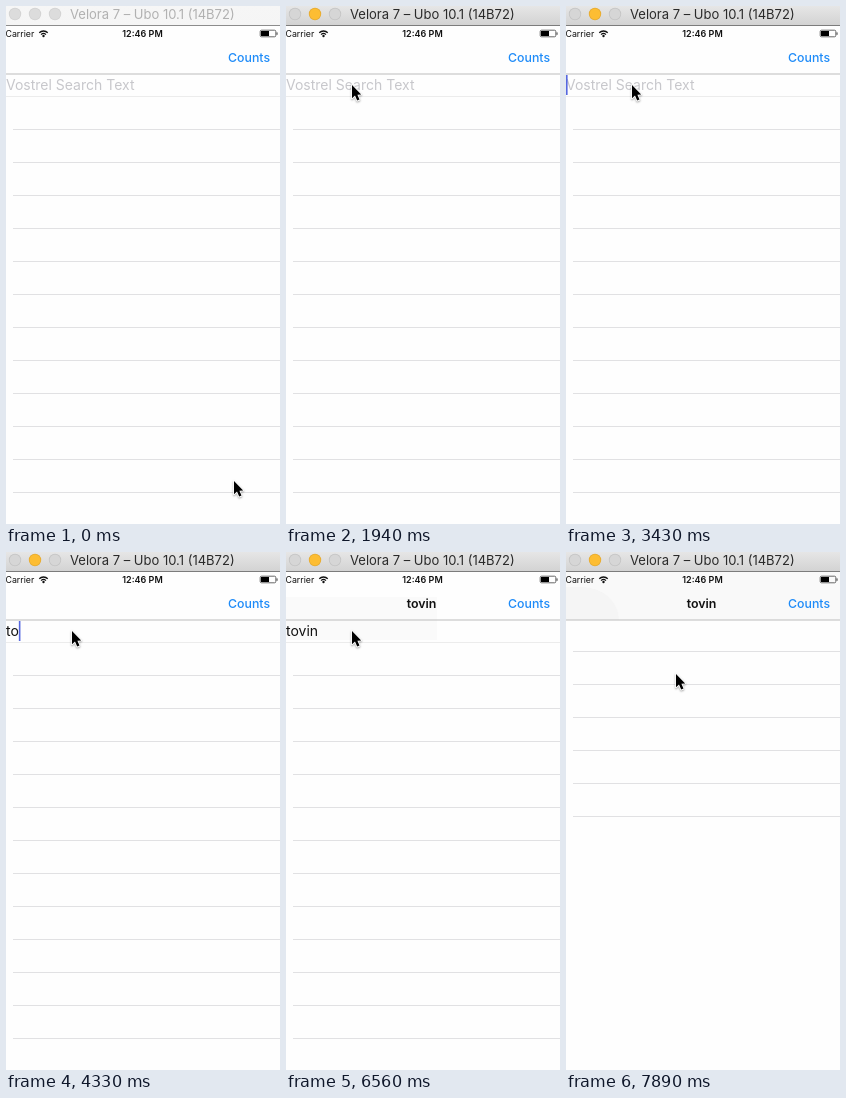
An HTML page with a canvas for the animation above (8000 ms loop, 274 by 518 pixels).

```html
<!DOCTYPE html>
<html lang="en">
<head>
<meta charset="utf-8">
<title>Search screen</title>
<style>
html, body { margin: 0; width: 100%; height: 100%; overflow: hidden; background: #fff; }
canvas { display: block; width: 274px; height: 518px; }
</style>
</head>
<body>
<canvas id="stage"></canvas>
<script>
const W = 274, H = 518, LOOP = 8000;
const BEAT = 148.8; // the screen refreshes once per beat
const FOCUS = 16, TYPE = 28, SUBMIT = 44, SCROLL = 52, LOADED = 53;
const ROW = 33;
const FONT = 'Inter, Roboto, "Liberation Sans", sans-serif';
const QUERY = 'tovin';
const HINT = 'Vostrel Search Text';
const DEVICE = 'Velora 7 – Ubo 10.1 (14B72)';

// Pointer stops: beat, x, y
const stops = [
  [8, 228, 475], [9, 129, 331], [12, 66, 79], [47, 66, 79],
  [48, 104, 175], [49, 105, 163], [51, 105, 163], [LOADED, 110, 122]
];

const canvas = document.getElementById('stage');
const ctx = canvas.getContext('2d');
const dpr = window.devicePixelRatio || 1;
canvas.width = W * dpr;
canvas.height = H * dpr;

const clamp = (v, lo = 0, hi = 1) => Math.min(hi, Math.max(lo, v));
const easeOut = k => k * (2 - k);

function pointerAt(beat) {
  const next = stops.findIndex(s => s[0] > beat);
  if (next < 0) return stops[stops.length - 1].slice(1);
  const [t1, x1, y1] = stops[next];
  const [t0, x0, y0] = stops[Math.max(0, next - 1)];
  const k = easeOut(clamp((beat - t0) / (t1 - t0 || 1)));
  return [x0 + (x1 - x0) * k, y0 + (y1 - y0) * k];
}

function caretAlpha(beat) {
  if (beat < FOCUS) return 0;
  if (beat >= TYPE) return clamp((TYPE + 9 - beat) / 2);
  const fromPeak = Math.abs((beat - FOCUS + 2) % 7 - 3); // blinks every 7 beats
  return clamp((3 - fromPeak) / 2);
}

function rect(x, y, w, h, color) {
  ctx.fillStyle = color;
  ctx.fillRect(x, y, w, h);
}

function text(str, x, y, size, color, weight = 400, align = 'left') {
  ctx.font = `${weight} ${size}px ${FONT}`;
  ctx.textAlign = align;
  ctx.fillStyle = color;
  ctx.fillText(str, x, y);
}

function disc(x, y, r, fill) {
  ctx.beginPath();
  ctx.arc(x, y, r, 0, Math.PI * 2);
  ctx.fillStyle = fill;
  ctx.fill();
}

function windowBar(active) {
  const shade = ctx.createLinearGradient(0, 0, 0, 19);
  shade.addColorStop(0, active ? '#e6e6e6' : '#f6f6f6');
  shade.addColorStop(1, active ? '#d3d3d3' : '#f5f5f5');
  rect(0, 0, W, 19, shade);
  rect(0, 19, W, 1, active ? '#7c7c7c' : '#8c8c8c');
  for (let i = 0; i < 3; i++) {
    const lit = active && i === 1;
    disc(9 + 20 * i, 8, 6.2, lit ? '#e6ab30' : active ? '#c4c4c4' : '#d2d2d2');
    disc(9 + 20 * i, 8, 5.4, lit ? '#fdbd32' : active ? '#d6d6d6' : '#dcdcdc');
  }
  text(DEVICE, 64, 13, 13, active ? '#2a2a2a' : '#b1b1b1');
}

function statusBar() {
  text('Carrier', -0.5, 31, 8.8, '#111');
  text('12:46 PM', 136.5, 31, 9, '#111', 600, 'center');
  ctx.strokeStyle = '#111';
  ctx.lineWidth = 1.3;
  for (const r of [3.4, 6]) {
    ctx.beginPath();
    ctx.arc(37.5, 31, r, -Math.PI * 0.75, -Math.PI * 0.25);
    ctx.stroke();
  }
  disc(37.5, 30, 1.2, '#111');
  ctx.lineWidth = 0.8;
  ctx.strokeStyle = '#444';
  ctx.beginPath();
  ctx.roundRect(254.2, 24.2, 15.6, 6.6, 1.3);
  ctx.stroke();
  rect(255, 25, 8, 5, '#000');
  rect(270.4, 26.4, 1.2, 2.4, '#555');
}

function navBar(beat) {
  const loaded = beat >= LOADED;
  rect(0, 20, W, 48, loaded ? '#f9f9f9' : '#fefefe');
  if (loaded) {
    ctx.beginPath();
    ctx.ellipse(16, 68, 37, 33, 0, -Math.PI / 2, 0);
    ctx.lineTo(0, 68);
    ctx.lineTo(0, 35);
    ctx.fillStyle = '#f5f5f5';
    ctx.fill();
  } else if (beat >= SUBMIT) {
    rect(0, 45, 151, 23, '#fafafa');
  }
  statusBar();
  if (beat >= SUBMIT) text(QUERY, 135.5, 56, 12.4, '#111', 600, 'center');
  text('Counts', 264, 56, 12.3, '#1e8bf8', 500, 'right');
  rect(0, 67.5, W, 1, '#bdbdbd');
}

function searchField(beat, y) {
  if (beat >= SUBMIT && !y) rect(0, 68, 151, 20, '#fafafa');
  const word = QUERY.slice(0, clamp(beat - TYPE + 1, 0, QUERY.length));
  text(word || HINT, 0, 84 + y, 14, word ? '#111' : '#c7c7cb');
  rect(0, 90 + y, W, 1, '#ececec');
  const x = word ? ctx.measureText(word).width : 0;
  ctx.globalAlpha = caretAlpha(beat);
  rect(x, 69 + y, 1.6, 20, '#5668e0');
  ctx.globalAlpha = 1;
}

function table(beat) {
  const y = beat >= SCROLL ? -24 : 0;
  const bottom = beat >= LOADED ? 270 : H;
  searchField(beat, y);
  for (let line = 90 + ROW + y; line < bottom - 20 || line < 270; line += ROW) {
    if (line < bottom) rect(7, line, W - 7, 1, '#e1e1e3');
  }
}

function arrow(x, y) {
  ctx.save();
  ctx.translate(x, y);
  const shape = new Path2D('M0 0V13.3L3 10.6L5.2 15.6L7.5 14.6L5.4 9.8L9.2 9.4Z');
  ctx.lineJoin = 'round';
  ctx.shadowColor = 'rgba(0,0,0,.35)';
  ctx.shadowBlur = 2 * dpr;
  ctx.shadowOffsetY = dpr;
  ctx.strokeStyle = '#fff';
  ctx.lineWidth = 1.7;
  ctx.stroke(shape);
  ctx.shadowColor = 'transparent';
  ctx.fillStyle = '#000';
  ctx.fill(shape);
  ctx.restore();
}

function draw(t) {
  const beat = Math.floor(t / BEAT);
  ctx.setTransform(dpr, 0, 0, dpr, 0, 0);
  rect(0, 0, W, H, '#fefefe');
  table(beat);
  navBar(beat);
  windowBar(beat >= 13);
  arrow(...pointerAt(beat));
}

const start = performance.now();
function tick() {
  draw((performance.now() - start) % LOOP);
  requestAnimationFrame(tick);
}
tick();
</script>
</body>
</html>
```
